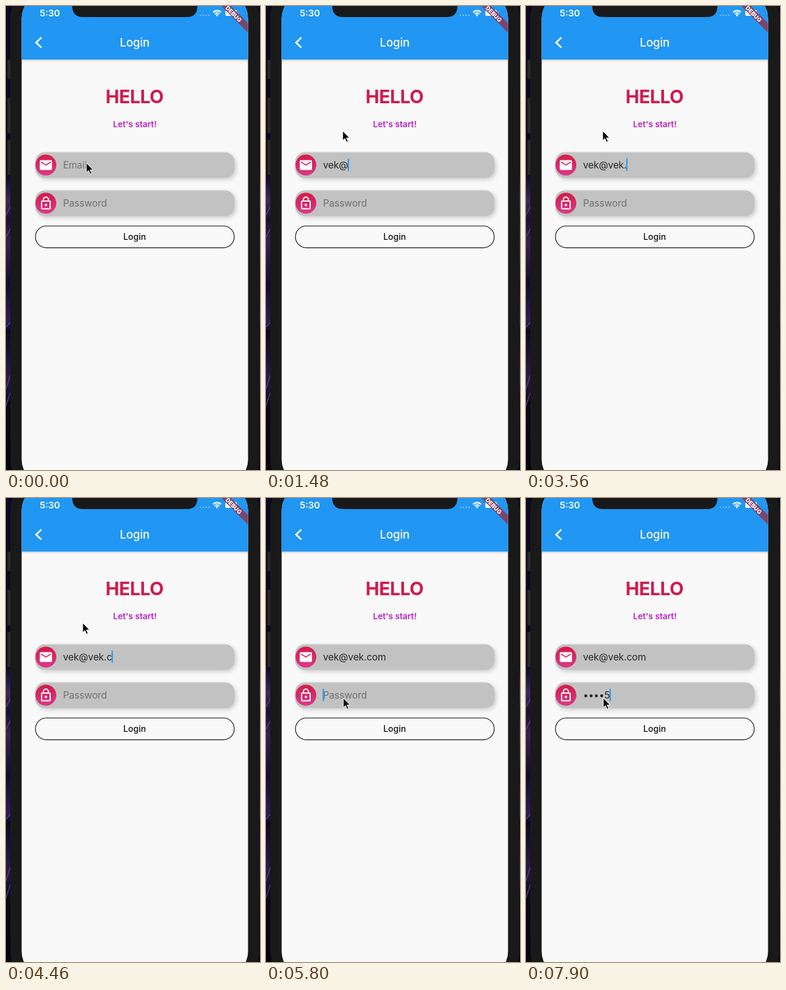
Recreate the animation shown at these times as an HTML page. Size 414 by 754 pixels, loop 8000 ms.

```html
<!DOCTYPE html>
<html lang="en">
<head>
<meta charset="utf-8">
<title>Login form</title>
<style>
  html, body { margin: 0; width: 100%; height: 100%; overflow: hidden; background: #08071a; }
  svg { display: block; width: 414px; height: 754px; }
  text { font-family: Inter, Roboto, sans-serif; }
  .mid { text-anchor: middle; }
  .field { fill: #c2c2c2; filter: drop-shadow(3px 3px 3px rgba(0, 0, 0, .17)); }
  .input { font-size: 15.6px; letter-spacing: -.1px; fill: #242424; }
  .hint { fill: #707070; }
  .caret { fill: #2196f3; }
</style>
</head>
<body>
<svg viewBox="0 0 414 754">
  <defs>
    <linearGradient id="wall" x2="0" y2="1">
      <stop offset="0" stop-color="#090a20"/>
      <stop offset=".36" stop-color="#0b0820"/>
      <stop offset=".42" stop-color="#3c2860"/>
      <stop offset=".46" stop-color="#1a1034"/>
      <stop offset=".51" stop-color="#352152"/>
      <stop offset=".6" stop-color="#130b2c"/>
      <stop offset=".68" stop-color="#2e1c58"/>
      <stop offset=".7" stop-color="#0c071c"/>
      <stop offset=".8" stop-color="#2a1a4c"/>
      <stop offset=".86" stop-color="#0b0719"/>
      <stop offset="1" stop-color="#05040d"/>
    </linearGradient>
    <linearGradient id="pink" x2="0" y2="1">
      <stop offset="0" stop-color="#d31b48"/>
      <stop offset="1" stop-color="#dc3888"/>
    </linearGradient>
    <clipPath id="screen"><rect x="25.5" y="-20" width="369" height="797" rx="40"/></clipPath>
  </defs>

  <!-- phone body -->
  <rect width="414" height="754" fill="url(#wall)"/>
  <path d="M0 340L7 326M0 376L7 362M0 522L7 514M0 622L7 600M0 650L7 628" stroke="#7552a8" stroke-width="1.5" opacity=".6"/>
  <g fill="#29292b" stroke="#111" stroke-width=".8">
    <rect x="2" y="87" width="8" height="32" rx="1.5"/>
    <rect x="2" y="149" width="8" height="58" rx="1.5"/>
    <rect x="2" y="217" width="8" height="58" rx="1.5"/>
  </g>
  <rect x="7" y="-38" width="406" height="833" rx="58" fill="#19191a"/>

  <g clip-path="url(#screen)">
    <rect x="25" y="-20" width="370" height="800" fill="#f9f9f9"/>
    <rect x="15" y="-20" width="390" height="107" fill="#2196f3" style="filter: drop-shadow(0 2px 1.5px rgba(0, 0, 0, .16))"/>

    <!-- status bar -->
    <text x="55" y="16.5" font-size="14.8" font-weight="600" fill="#fff">5:30</text>
    <path d="M317 15h16" stroke="#fff" stroke-width="2.6" stroke-linecap="round" stroke-dasharray="0 4.7" opacity=".4"/>
    <g fill="none" stroke="#fff" stroke-width="2.3">
      <path d="M337.5 10.2a9.2 9.2 0 0 1 13 0M340.2 13a5.4 5.4 0 0 1 7.6 0"/>
    </g>
    <path d="M344 17l-2.2-2.3a3.1 3.1 0 0 1 4.4 0z" fill="#fff"/>
    <rect x="357.5" y="6.5" width="19" height="9.5" rx="2.6" fill="#fff"/>
    <path d="M378 9.5q2 1.7 0 3.5z" fill="#fff" opacity=".6"/>

    <!-- debug ribbon -->
    <path d="M331 -20L394.5 43.5V28L346.5 -20z" fill="#843f60" opacity=".93"/>
    <text class="mid" transform="translate(371 13) rotate(45)" y="3.3" font-size="9.4" font-weight="800" fill="#fff">DEBUG</text>

    <!-- header -->
    <path d="M57.6 51.2L49 59.4l8.6 8.2" fill="none" stroke="#fff" stroke-width="2.7"/>
    <text class="mid" x="209.8" y="66" font-size="18.5" font-weight="500" letter-spacing="-.1" fill="#fff">Login</text>
    <text class="mid" x="209.5" y="158" font-size="30" font-weight="700" letter-spacing="-.5" fill="#d11b4c">HELLO</text>
    <text class="mid" x="210" y="197" font-size="13.7" font-weight="600" fill="#b51fc0">Let's start!</text>

    <!-- inputs -->
    <g id="email">
      <rect class="field" x="47.5" y="237.5" width="325" height="42" rx="16"/>
      <path d="M62 238.3h296" stroke="#d0d0d0"/>
      <circle cx="65" cy="258.5" r="17" fill="url(#pink)"/>
      <path transform="translate(53 246.5)" fill="#fff" d="M20 4H4a2 2 0 0 0-2 2v12a2 2 0 0 0 2 2h16a2 2 0 0 0 2-2V6a2 2 0 0 0-2-2zm0 4l-8 5-8-5V6l8 5 8-5z"/>
      <text class="input hint" x="93" y="264">Email</text>
      <text class="input value" x="93" y="264"></text>
      <rect class="caret" y="248" width="2" height="20"/>
    </g>
    <g id="pass">
      <rect class="field" x="47.5" y="299.5" width="325" height="42" rx="16"/>
      <path d="M62 300.3h296" stroke="#d0d0d0"/>
      <circle cx="65" cy="320.5" r="17" fill="url(#pink)"/>
      <g fill="none" stroke="#fff" stroke-width="2">
        <rect x="58" y="317" width="14" height="12.5" rx="1"/>
        <path d="M61 317v-2.5a4 4 0 0 1 8 0v2.5"/>
      </g>
      <circle cx="65" cy="323.3" r="2" fill="#fff"/>
      <text class="input hint" x="93" y="326">Password</text>
      <text class="input value" x="93" y="326"></text>
      <rect class="caret" y="310" width="2" height="20"/>
    </g>

    <rect x="48" y="357.5" width="324" height="35.3" rx="17.6" fill="none" stroke="#111" stroke-width="1.2"/>
    <text class="mid" x="209.7" y="380" font-size="14" font-weight="500" fill="#111">Login</text>
  </g>

  <path d="M108 -10V0Q108 18 126 18H294Q312 18 312 0V-10z" fill="#19191a"/>

  <path id="pointer" d="M0 0V15.6l3.6-3.4 2.6 6 2.5-1.1-2.6-5.8h5z" fill="#000" stroke="#fff" stroke-width="1" stroke-linejoin="round"/>
</svg>

<script>
  const LOOP = 8000;
  const START = performance.now();

  // Each track is a list of [time, value]; a value holds until the next time.
  const emailText = [
    [0, ''], [580, 'v'], [730, 've'], [1030, 'vek'], [1480, 'vek@'],
    [1780, 'vek@wv'], [2080, 'vek@wve'], [2530, 'vek@wv'], [2670, 'vek@'],
    [2820, 'vek@v'], [2970, 'vek@ve'], [3270, 'vek@vek'], [3560, 'vek@vek.'],
    [3710, 'vek@vek.c'], [3860, 'vek@vek.cm'], [4460, 'vek@vek.c'],
    [4760, 'vek@vek.co'], [4910, 'vek@vek.com']
  ];
  const passText = [[0, ''], [6400, 1], [6850, 2], [7150, 3], [7450, 4], [7900, 5]]
    .map(([time, n]) => [time, n && '•'.repeat(n - 1) + n]);
  const emailHint = [[0, 1], [580, .6], [730, .1], [1030, 0]];
  const passHint = [[0, 1], [6400, .6], [6550, .1], [6850, 0]];
  const focus = [[0, ''], [140, 'email'], [5800, 'pass']];
  const pointerPos = [
    [0, [131, 255]], [290, [129, 238]], [440, [125, 203]],
    [5060, [122, 214]], [5210, [118, 238]], [5350, [117, 272]],
    [5500, [120, 302]], [5650, [124, 320]], [5800, [126, 325]]
  ];

  const at = (track, t) => track.findLast(([time]) => time <= t)[1];
  const pointer = document.getElementById('pointer');

  function drawField(id, text, hint, t) {
    const part = name => document.querySelector(`#${id} .${name}`);
    const value = part('value');
    value.textContent = text;
    part('hint').setAttribute('opacity', hint);
    const caret = part('caret');
    const width = text ? value.getComputedTextLength() : 0;
    caret.setAttribute('x', 93 + width - .6);
    caret.setAttribute('opacity', at(focus, t) === id ? 1 : 0);
  }

  function draw() {
    const t = (performance.now() - START) % LOOP;
    drawField('email', at(emailText, t), at(emailHint, t), t);
    drawField('pass', at(passText, t), at(passHint, t), t);
    pointer.setAttribute('transform', `translate(${at(pointerPos, t)})`);
    requestAnimationFrame(draw);
  }
  draw();
</script>
</body>
</html>
```
